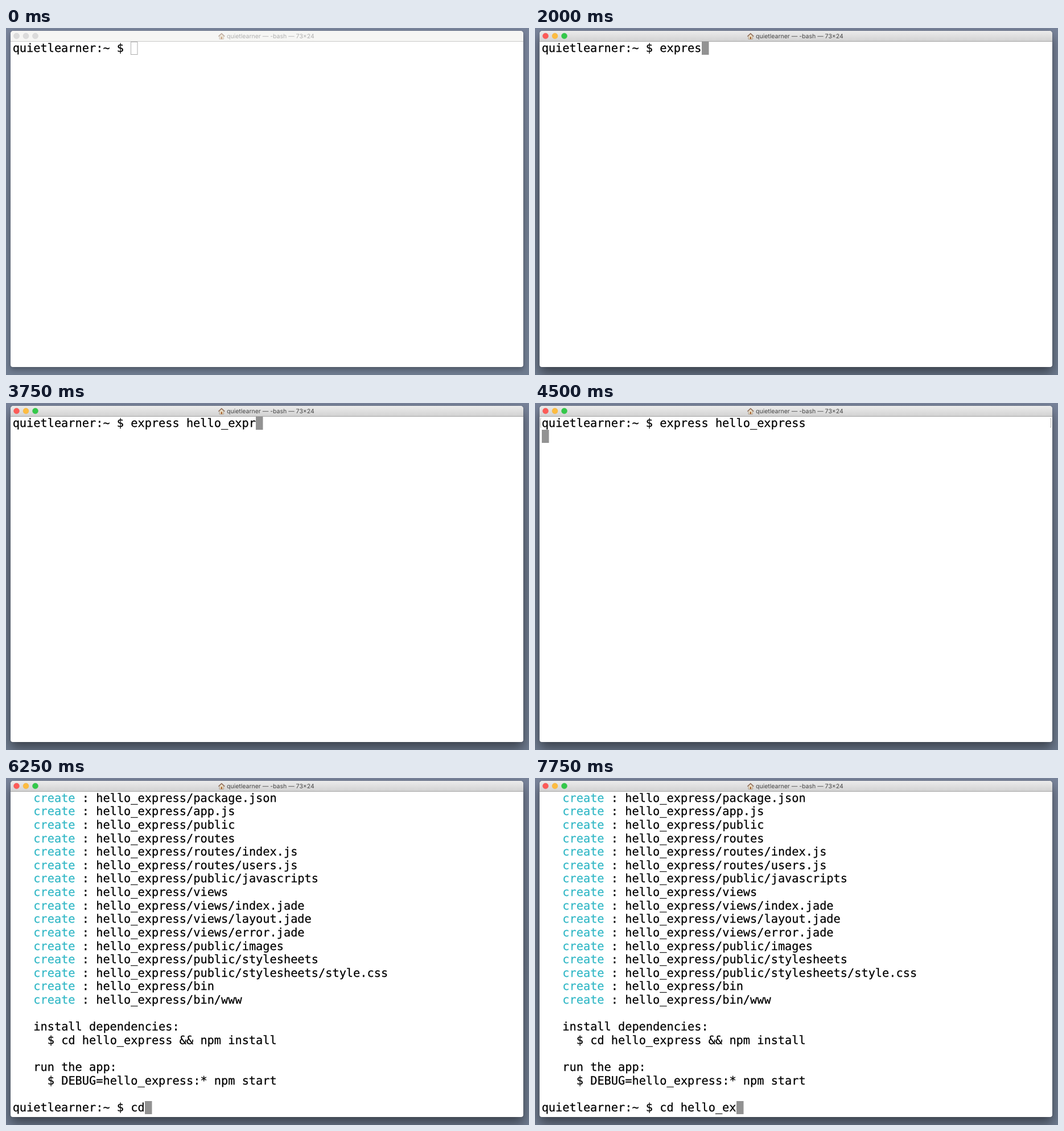
Recreate the animation shown at these times as an HTML page. Size 919 by 609 pixels, loop 8000 ms.

```html
<!DOCTYPE html>
<html lang="en">
<head>
<meta charset="utf-8">
<title>Terminal</title>
<style>
  html, body { margin: 0; width: 100%; height: 100%; overflow: hidden; }
  body { position: relative; background: linear-gradient(#78839a, #6d798c 50%, #6f7c90); }
  #window {
    position: absolute; left: 7.5px; top: 5px; width: 901px; height: 589.5px;
    border-radius: 5px 5px 4px 4px; background: #fff; overflow: hidden;
    box-shadow: 0 0 1px rgba(0,0,0,.5), 0 5px 10px rgba(0,0,0,.28);
  }
  #bar { height: 18px; background: #f6f6f4; border-bottom: 1px solid #c9c9c9; }
  .active #window { box-shadow: 0 0 1px rgba(0,0,0,.6), 0 11px 20px rgba(0,0,0,.46); }
  .active #bar { background: linear-gradient(#ececec, #d2d2d2); border-color: #a3a3a3; }
  svg { position: absolute; left: 0; top: 0; width: 919px; height: 609px; }
  text { white-space: pre; text-rendering: geometricPrecision; }
  #screen text { font: 20.3px "DejaVu Sans Mono", monospace; stroke: #000; stroke-width: .25px; }
  #screen text.cyan { fill: #33b8c6; stroke: #33b8c6; }
  #title { font: 10.5px Inter, sans-serif; fill: #b0b0b0; }
  .active #title { fill: #464646; }
  #lights circle { fill: #dcdcdc; stroke: #c8c8c8; stroke-width: .4px; }
  .active #lights circle { fill: var(--on); stroke: var(--rim); }
  #house { opacity: .55; }
  .active #house { opacity: 1; }
  #cursor { fill: none; stroke: #adadad; }
  .active #cursor { fill: #929292; stroke: #929292; }
</style>
</head>
<body>
<div id="window"><div id="bar"></div></div>
<svg viewBox="0 0 919 609">
  <g id="lights">
    <circle cx="18.5" cy="14" r="5" style="--on:#fc5b57;--rim:#e8504c"/>
    <circle cx="35" cy="14" r="5" style="--on:#fdbc40;--rim:#eaab39"/>
    <circle cx="51.5" cy="14" r="5" style="--on:#34c84a;--rim:#2db840"/>
  </g>
  <g id="house">
    <path d="M375 14v5.5h7.5V14l-3.7-3.6z" fill="#e8dcc4" stroke="#8d7a66" stroke-width=".6"/>
    <path d="M377.7 19.5v-4h2.3v4z" fill="#a5632f"/>
    <path d="M373.3 14.8l5.5-5.2 5.5 5.2" fill="none" stroke="#8a6550" stroke-width="1.3"/>
  </g>
  <text id="title" x="388" y="18"></text>
  <g id="screen">
    <rect id="cursor" width="11.5" height="22"/>
    <g id="output"></g>
    <text id="line"></text>
    <path id="marks" d="M11 27.5H9.5V42.5H11M905 27.5h1.5V42.5H905" fill="none" stroke="#b5b5b5"/>
  </g>
  <path id="pointer" d="M0 0v13.2l3-2.8 2.1 4.9 2.2-.9-2.1-4.8h4.1z" stroke="#fff" stroke-width=".9"/>
</svg>
<script>
const $ = id => document.getElementById(id);
const USER = 'quietlearner', PROMPT = USER + ':~ $ ';
const LOOP = 8000, TICK = 250, LAST_ROW = 23;
const colX = col => 11.65 + col * 12.22;
const rowY = row => Math.round(23.5 + row * 23.62);
const baseline = row => Math.round(41.7 + row * 23.62);

// Characters entered by the end of each tick, from the given start time.
const commands = [
  { start: 1500, text: 'express hello_express', counts: [1, 4, 6, 8, 9, 11, 13, 14, 15, 18, 20, 21] },
  { start: 6250, text: 'cd hello_express', counts: [2, 3, 4, 6, 8, 9, 11] }
];
const ENTER = 4500, OUTPUT = 4750;

const files = ['package.json', 'app.js', 'public', 'routes', 'routes/index.js', 'routes/users.js',
  'public/javascripts', 'views', 'views/index.jade', 'views/layout.jade', 'views/error.jade',
  'public/images', 'public/stylesheets', 'public/stylesheets/style.css', 'bin', 'bin/www'];

function put(text, col, row, className = '') {
  const node = document.createElementNS('http://www.w3.org/2000/svg', 'text');
  node.setAttribute('x', colX(col));
  node.setAttribute('y', baseline(row));
  node.setAttribute('class', className);
  node.textContent = text;
  $('output').append(node);
}
files.forEach((file, row) => {
  put('create', 3, row, 'cyan');
  put(': hello_express/' + file, 10, row);
});
put('install dependencies:', 3, 17);
put('$ cd hello_express && npm install', 5, 18);
put('run the app:', 3, 20);
put('$ DEBUG=hello_express:* npm start', 5, 21);
$('title').textContent = USER + ' — -bash — 73×24';
$('line').setAttribute('x', colX(0));

const show = (id, on) => $(id).setAttribute('visibility', on ? 'visible' : 'hidden');

function typed({ start, text, counts }, t) {
  const step = Math.floor((t - start) / TICK);
  return step < 0 ? '' : text.slice(0, counts[Math.min(step, counts.length - 1)]);
}

function draw(now) {
  const t = now % LOOP;
  const done = t >= OUTPUT, waiting = t >= ENTER && !done;
  const line = PROMPT + typed(commands[done ? 1 : 0], t);
  const row = done ? LAST_ROW : 0;

  document.body.className = t >= 500 ? 'active' : '';
  show('output', done);
  show('marks', waiting);
  $('line').textContent = line;
  $('line').setAttribute('y', baseline(row));
  $('cursor').setAttribute('x', Math.round(colX(waiting ? 0 : line.length)) + .5);
  $('cursor').setAttribute('y', rowY(waiting ? 1 : row) + .5);

  show('pointer', t >= 250 && t < 750);
  $('pointer').setAttribute('transform', t < 500 ? 'translate(474.5 297.5)' : 'translate(505 443)');
  requestAnimationFrame(draw);
}
draw(performance.now());
</script>
</body>
</html>
```
